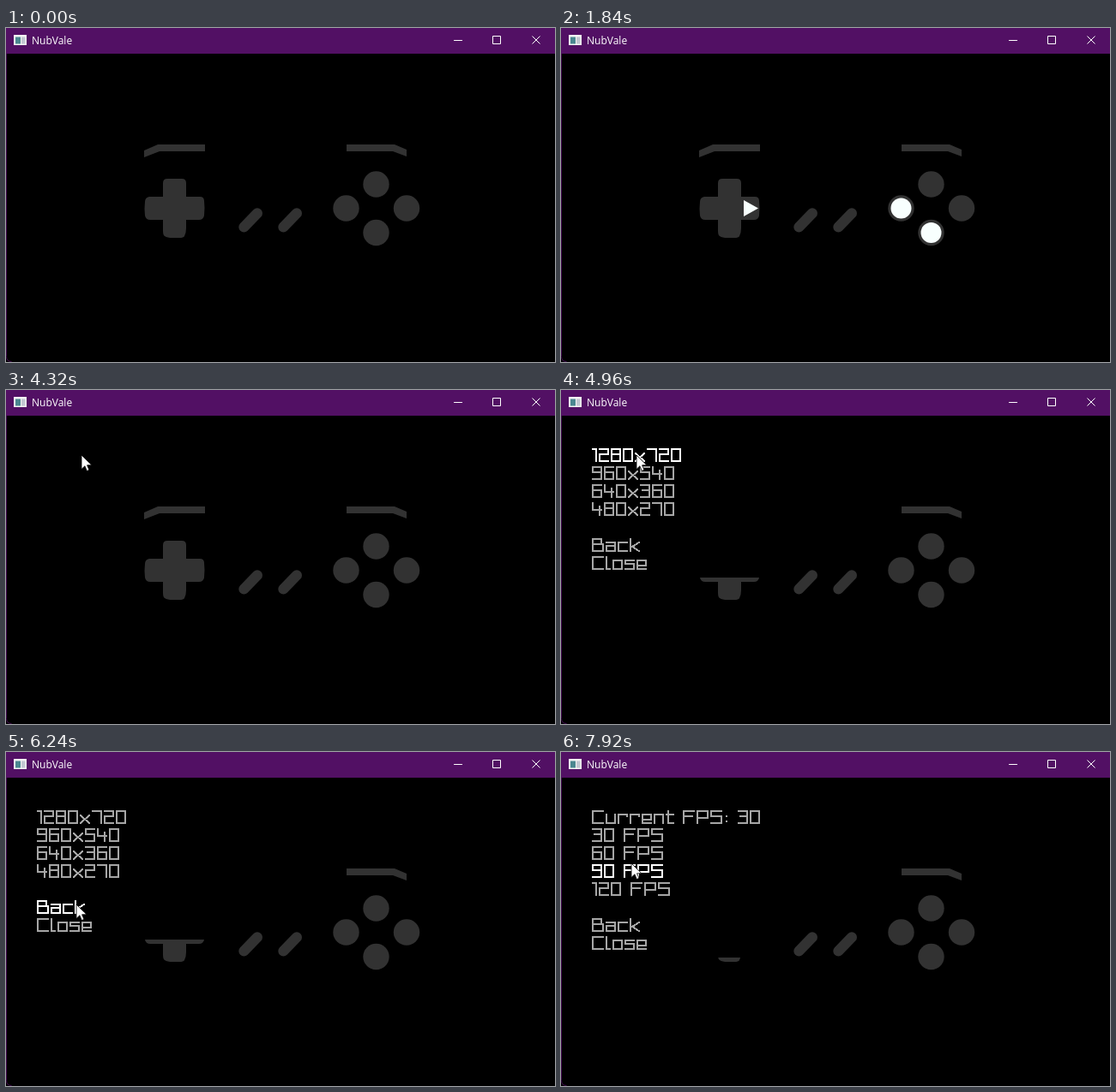
An HTML page without scripts that plays this animation: 640x390 px, repeating every 8000 ms.

```html
<!DOCTYPE html>
<html lang="en">
<head>
<meta charset="utf-8">
<title>NubVale</title>
<style>
html, body { margin: 0; width: 100%; height: 100%; overflow: hidden; background: #000; }
svg { display: block; }
.stage { width: 100vw; height: 100vh; }
.title { font: 12px "Open Sans", "Noto Sans", sans-serif; fill: #fff; }
.chrome { fill: none; stroke: #fff; stroke-width: 1; }
.pad { fill: #323232; }
.lit { fill: #f8fffe; }

/* pixel lettering, one unit = 2px; the text elements stay selectable */
.glyphs { fill: none; stroke: #a6a6a6; stroke-width: 1; stroke-linecap: square; shape-rendering: crispEdges; }
.glyphs text { font: 9px "DejaVu Sans Mono", monospace; fill: transparent; stroke: none; }

.right, .west, .south, .menu, .hover, .cursor { animation: 8s step-end infinite; }
.right { animation-name: right; }
.west { animation-name: west; }
.south { animation-name: south; }
.main { animation-name: main; }
.res { animation-name: res; }
.fps { animation-name: fps; }
.hover { animation-name: hover; mix-blend-mode: color-dodge; }
.cursor { animation-name: cursor; animation-timing-function: linear; }

@keyframes right { 0%, 37% { visibility: hidden } 9% { visibility: visible } }
@keyframes west { 0%, 37% { visibility: hidden } 11% { visibility: visible } }
@keyframes south {
  0%, 17%, 25%, 34% { visibility: hidden }
  14%, 21%, 31% { visibility: visible }
}
@keyframes main { 0%, 59%, 90% { visibility: hidden } 55%, 79% { visibility: visible } }
@keyframes res { 0%, 79% { visibility: hidden } 59% { visibility: visible } }
@keyframes fps { 0% { visibility: hidden } 90%, 100% { visibility: visible } }

/* jumps to whichever row the pointer is on */
@keyframes hover {
  0%, 72.6%, 79% { transform: translateY(-200px) }
  55% { transform: none }
  66.1%, 85.1% { transform: translateY(21px) }
  68.3%, 83.5%, 94.9% { transform: translateY(42px) }
  70.4%, 82%, 97.85%, 100% { transform: translateY(63px) }
  80.5% { transform: translateY(84px) }
  75.1% { transform: translateY(105px) }
}
@keyframes cursor {
  0%, 43% { transform: translate(94px, -32px) }
  44% { transform: translate(93px, -18.5px) }
  50% { transform: translate(90px, 55px) }
  53%, 65% { transform: translate(88px, 76px) }
  73% { transform: translate(90px, 154px) }
  76%, 80% { transform: translate(82px, 178px) }
  86%, 93% { transform: translate(73px, 95px) }
  98%, 100% { transform: translate(82px, 130px) }
}
</style>
</head>
<body>
<svg class="stage" viewBox="0 0 640 390">
<defs>
  <path id="n0" d="M0 0H5V7H0Z"/>
  <path id="n1" d="M0 0H2V7"/>
  <path id="n2" d="M0 0H5V3H0V7H5"/>
  <path id="n3" d="M0 0H5V7H0M1 3H5"/>
  <path id="n4" d="M0 0V4H5M4 2V7"/>
  <path id="n5" d="M5 0H0V3H5V7H0"/>
  <path id="n6" d="M5 0H0V7H5V3H0"/>
  <path id="n7" d="M0 0H5V7"/>
  <path id="n8" d="M0 0H5V7H0ZM0 3H5"/>
  <path id="n9" d="M5 3H0V0H5V7H0"/>
  <path id="colon" d="M1 3v.01M1 6v.01"/>
  <path id="B" d="M0 0H5V3H6V7H0ZM0 3H5"/>
  <path id="C" d="M6 0H0V7H6"/>
  <path id="F" d="M6 0H0V7M0 3H5"/>
  <path id="M" d="M0 7V0L3.5 4L7 0V7"/>
  <path id="P" d="M0 7V0H6V4H0"/>
  <path id="R" d="M0 7V0H6V3H0M3 3L6 7"/>
  <path id="S" d="M6 0H0V3H6V7H0"/>
  <path id="T" d="M0 0H6M3 0V7"/>
  <path id="a" d="M0 2H5V7H0V4H5"/>
  <path id="c" d="M5 2H0V7H5"/>
  <path id="d" d="M5 0V7H0V2H5"/>
  <path id="e" d="M5 7H0V2H5V5H0"/>
  <path id="f" d="M3 0H1V7M0 3H3"/>
  <path id="g" d="M5 7H0V2H5V9H0"/>
  <path id="i" d="M0 0v.01M0 2V7"/>
  <path id="k" d="M0 0V7M5 2L1 4.5L5 7"/>
  <path id="l" d="M0 0V7H2"/>
  <path id="m" d="M0 7V2H6V7M3 2V7"/>
  <path id="n" d="M0 7V2H5V7"/>
  <path id="o" d="M0 2H5V7H0Z"/>
  <path id="p" d="M0 9V2H5V7H0"/>
  <path id="r" d="M0 7V2H5V3"/>
  <path id="s" d="M5 2H0V4H5V7H0"/>
  <path id="t" d="M1 0V7H4M0 2H4"/>
  <path id="u" d="M0 2V7H5V2"/>
  <path id="x" d="M0 2.5L5 7M5 2.5L0 7"/>

  <g id="back"><use href="#B"/><use href="#a" x="8"/><use href="#c" x="15"/><use href="#k" x="22"/></g>
  <g id="close"><use href="#C"/><use href="#l" x="8"/><use href="#o" x="12"/><use href="#s" x="19"/><use href="#e" x="26"/></g>
  <g id="color"><use href="#C"/><use href="#o" x="8"/><use href="#l" x="15"/><use href="#o" x="19"/><use href="#r" x="26"/></g>
  <g id="rate"><use href="#F"/><use href="#P" x="8"/><use href="#S" x="16"/></g>
  <g id="button"><use href="#B"/><use href="#u" x="8"/><use href="#t" x="15"/><use href="#t" x="21"/><use href="#o" x="27"/><use href="#n" x="34"/></g>
</defs>

<rect width="640" height="390"/>
<path d="M.5 30V383.500q0 6 6 6" fill="none" stroke="#430d52"/>
<rect width="640" height="30" fill="#521064"/>
<rect x="9" y="8" width="15" height="12" fill="#f4f4f4"/>
<rect x="11" y="10.500" width="6" height="8" fill="#4a8790"/>
<rect x="18" y="10.500" width="4.500" height="8" fill="#c3c8d2"/>
<text class="title" x="30" y="19">NubVale</text>
<path class="chrome" d="M522 14.500H532M567.500 9.500h9v9h-9ZM613.500 9.500l9 9M622.500 9.500l-9 9"/>

<g class="pad">
  <path d="M161 143L177 136H232V144H179L161 151Z"/>
  <path d="M397 136H453L467 142V150L451 144H397Z"/>
  <path d="M183 181q0-5 5-5h17q5 0 5 5v16h16q5 0 5 5q1 8 0 17q-1 5-6 5h-15v10q0 5-2 9q-1 2-6 2h-8q-6 0-9-2q-2-1-2-6v-13h-15q-5 0-6-5q-1-8 0-16q0-5 5-6h16Z"/>
  <path d="M277.300 232.500L293 216.300M323.300 232.500L339 216.300" stroke="#323232" stroke-width="12" stroke-linecap="round"/>
  <circle cx="431.500" cy="182.500" r="15.200"/>
  <circle cx="396.500" cy="210.500" r="15.200"/>
  <circle cx="467" cy="210.500" r="15.200"/>
  <circle cx="431.500" cy="239" r="15.200"/>
</g>
<g class="lit">
  <path class="right" d="M213 201L230 210.500L213 220Z"/>
  <circle class="west" cx="396.500" cy="210.500" r="12"/>
  <circle class="south" cx="431.500" cy="239" r="12"/>
</g>

<g class="menu main">
  <rect x="20" y="55" width="238" height="206"/>
  <g class="glyphs" transform="translate(37 69) scale(2)">
    <g>
      <text y="7">Resolution Menu</text>
      <use href="#R"/><use href="#e" x="8"/><use href="#s" x="15"/><use href="#o" x="22"/><use href="#l" x="29"/><use href="#u" x="33"/><use href="#t" x="40"/><use href="#i" x="46"/><use href="#o" x="49"/><use href="#n" x="56"/>
      <use href="#M" x="67"/><use href="#e" x="76"/><use href="#n" x="83"/><use href="#u" x="90"/>
    </g>
    <g transform="translate(0 10.500)"><text y="7">FPS</text><use href="#rate"/></g>
    <g transform="translate(0 21)">
      <text y="7">Background Color</text>
      <use href="#back"/><use href="#g" x="29"/><use href="#r" x="36"/><use href="#o" x="43"/><use href="#u" x="50"/><use href="#n" x="57"/><use href="#d" x="64"/><use href="#color" x="75"/>
    </g>
    <g transform="translate(0 31.500)">
      <text y="7">Button Tint Color</text>
      <use href="#button"/><use href="#T" x="45"/><use href="#i" x="53"/><use href="#n" x="56"/><use href="#t" x="63"/><use href="#color" x="74"/>
    </g>
    <g transform="translate(0 42)">
      <text y="7">Remap Buttons</text>
      <use href="#R"/><use href="#e" x="8"/><use href="#m" x="15"/><use href="#a" x="23"/><use href="#p" x="30"/><use href="#button" x="41"/><use href="#s" x="82"/>
    </g>
    <g transform="translate(0 63)">
      <text y="7">Reload Config File</text>
      <use href="#R"/><use href="#e" x="8"/><use href="#l" x="15"/><use href="#o" x="19"/><use href="#a" x="26"/><use href="#d" x="33"/>
      <use href="#C" x="44"/><use href="#o" x="52"/><use href="#n" x="59"/><use href="#f" x="66"/><use href="#i" x="71"/><use href="#g" x="74"/>
      <use href="#F" x="85"/><use href="#i" x="93"/><use href="#l" x="96"/><use href="#e" x="100"/>
    </g>
    <g transform="translate(0 84)"><text y="7">Close</text><use href="#close"/></g>
  </g>
</g>

<g class="menu res">
  <rect x="20" y="55" width="238" height="164"/>
  <g class="glyphs" transform="translate(37 69) scale(2)">
    <g>
      <text y="7">1280x720</text>
      <use href="#n1"/><use href="#n2" x="4"/><use href="#n8" x="11"/><use href="#n0" x="18"/><use href="#x" x="25"/><use href="#n7" x="32"/><use href="#n2" x="39"/><use href="#n0" x="46"/>
    </g>
    <g transform="translate(0 10.500)">
      <text y="7">960x540</text>
      <use href="#n9"/><use href="#n6" x="7"/><use href="#n0" x="14"/><use href="#x" x="21"/><use href="#n5" x="28"/><use href="#n4" x="35"/><use href="#n0" x="42"/>
    </g>
    <g transform="translate(0 21)">
      <text y="7">640x360</text>
      <use href="#n6"/><use href="#n4" x="7"/><use href="#n0" x="14"/><use href="#x" x="21"/><use href="#n3" x="28"/><use href="#n6" x="35"/><use href="#n0" x="42"/>
    </g>
    <g transform="translate(0 31.500)">
      <text y="7">480x270</text>
      <use href="#n4"/><use href="#n8" x="7"/><use href="#n0" x="14"/><use href="#x" x="21"/><use href="#n2" x="28"/><use href="#n7" x="35"/><use href="#n0" x="42"/>
    </g>
    <g transform="translate(0 52.500)"><text y="7">Back</text><use href="#back"/></g>
    <g transform="translate(0 63)"><text y="7">Close</text><use href="#close"/></g>
  </g>
</g>

<g class="menu fps">
  <rect x="20" y="55" width="238" height="185"/>
  <g class="glyphs" transform="translate(37 69) scale(2)">
    <g>
      <text y="7">Current FPS: 30</text>
      <use href="#C"/><use href="#u" x="8"/><use href="#r" x="15"/><use href="#r" x="22"/><use href="#e" x="29"/><use href="#n" x="36"/><use href="#t" x="43"/>
      <use href="#rate" x="53"/><use href="#colon" x="77"/><use href="#n3" x="85"/><use href="#n0" x="92"/>
    </g>
    <g transform="translate(0 10.500)"><text y="7">30 FPS</text><use href="#n3"/><use href="#n0" x="7"/><use href="#rate" x="18.500"/></g>
    <g transform="translate(0 21)"><text y="7">60 FPS</text><use href="#n6"/><use href="#n0" x="7"/><use href="#rate" x="18.500"/></g>
    <g transform="translate(0 31.500)"><text y="7">90 FPS</text><use href="#n9"/><use href="#n0" x="7"/><use href="#rate" x="18.500"/></g>
    <g transform="translate(0 42)"><text y="7">120 FPS</text><use href="#n1"/><use href="#n2" x="4"/><use href="#n0" x="11"/><use href="#rate" x="22.500"/></g>
    <g transform="translate(0 63)"><text y="7">Back</text><use href="#back"/></g>
    <g transform="translate(0 73.500)"><text y="7">Close</text><use href="#close"/></g>
  </g>
</g>

<rect class="hover" x="30" y="66" width="226" height="21" fill="#fff"/>
<path class="cursor" d="M0 0V16.500l3.900-3.700 2.400 5.700 2.700-1.100-2.400-5.600H12Z" fill="#fff" stroke="#000" stroke-width=".8"/>
</svg>
</body>
</html>
```
